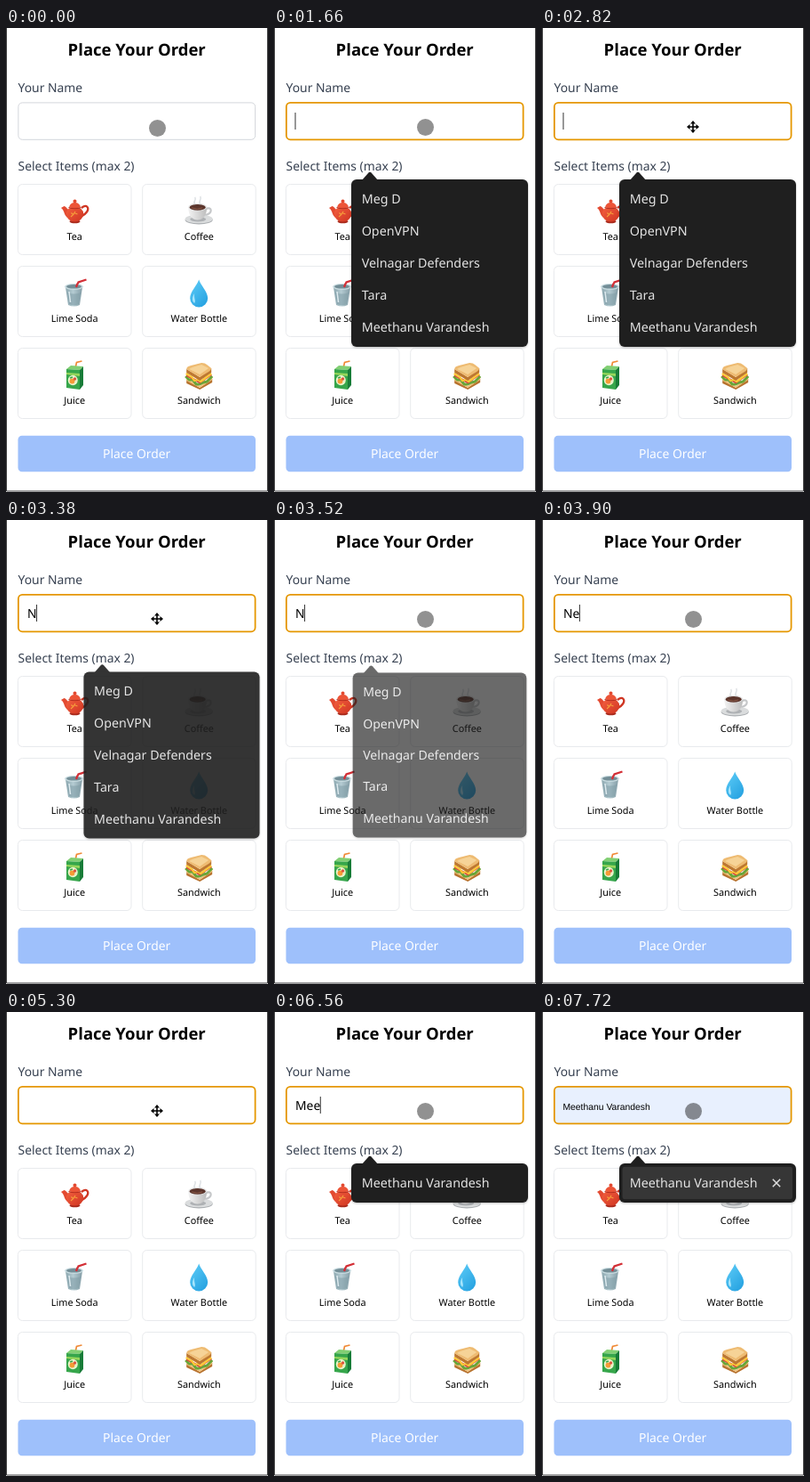
Recreate the animation shown at these times as an HTML page. Size 295 px wide and 521 px high, loop 8 s.

```html
<!DOCTYPE html>
<html lang="en">
<head>
<meta charset="utf-8">
<title>Place Your Order</title>
<style>
  html, body { margin: 0; width: 100%; height: 100%; overflow: hidden; background: #fff; }
  svg { display: block; width: 100%; height: 100%; }
  text { font: 13.9px "Noto Sans", sans-serif; text-rendering: geometricPrecision; white-space: pre; }
  .title { font-size: 18.55px; font-weight: 700; }
  .label { fill: #374151; }
  .item { font-size: 10.85px; }
  .mid { text-anchor: middle; }
  #panel text { font-size: 14.3px; fill: #e3e3e3; }
  #preview { font: 10.35px "Liberation Sans", Arial, sans-serif; }
  #panel { transform-origin: 186.5px 264px; filter: drop-shadow(0 1px 1px rgba(0,0,0,.25)); }
</style>
</head>
<body>
<svg viewBox="0 0 295 521" preserveAspectRatio="none">
  <defs>
    <linearGradient id="pot" x2="1" y2="1"><stop stop-color="#f4603f"/><stop offset="1" stop-color="#cf3522"/></linearGradient>
    <linearGradient id="china" x2="1"><stop stop-color="#f3f3f3"/><stop offset="1" stop-color="#bdbdbd"/></linearGradient>
    <linearGradient id="cup" x2="1"><stop stop-color="#8aa5ae"/><stop offset=".45" stop-color="#b4cbd2"/><stop offset="1" stop-color="#849da6"/></linearGradient>
    <linearGradient id="water" x2=".7" y2="1"><stop stop-color="#5ecdf8"/><stop offset="1" stop-color="#29a4e2"/></linearGradient>

    <g id="tea" fill="none">
      <path d="M24 12C30 7 33 12 30 16.5C28 19.5 25 20.5 23 22" stroke="#cf3522" stroke-width="2.3"/>
      <path d="M10 24C3.500 21 5.500 15 1 12L4.500 10C8 11.500 8 14 11 15Z" fill="#e34a31"/>
      <ellipse cx="16.500" cy="27.300" rx="6" ry="1.900" fill="#a92a1c"/>
      <ellipse cx="16.500" cy="18.800" rx="9.700" ry="8.600" fill="url(#pot)"/>
      <path d="M10 11.500Q11 6 16.500 6T23 11.500Z" fill="#ec5437"/>
      <path d="M9.500 11.500Q16.500 14 23.500 11.500" stroke="#b52f20" stroke-width="1.200"/>
      <circle cx="16.500" cy="4.500" r="2" fill="#e34a31"/>
      <path d="M12 22Q15 20 17 16M15 20L12.500 17.500M16.500 18L19.500 19" stroke="#f6a13c" stroke-width="1.100"/>
    </g>

    <g id="coffee" fill="none">
      <ellipse cx="16" cy="25.500" rx="15.500" ry="5" fill="#a9adb0"/>
      <ellipse cx="16" cy="24.500" rx="15.500" ry="4.800" fill="#dadcdd"/>
      <ellipse cx="15" cy="24.800" rx="9" ry="2.600" fill="#aeb1b4"/>
      <path d="M24 13C31 10 32 18 23 20" stroke="#c5c7c9" stroke-width="2.200"/>
      <path d="M4 11C4 20 8 25.500 14.500 25.500S25 20 25 11Z" fill="url(#china)"/>
      <ellipse cx="14.500" cy="11" rx="10.500" ry="4.300" fill="#e6e6e6"/>
      <ellipse cx="14.500" cy="11.400" rx="9" ry="3.300" fill="#5b352c"/>
      <path d="M8 12Q14 14.500 20 12" stroke="#8a5a48"/>
      <path d="M12 8C8 5 14 4 11.500 0M18 8C14 5 20 3 17.500 -1" stroke="#d5dadd" stroke-width="1.500" opacity=".8"/>
    </g>

    <g id="soda" fill="none">
      <path d="M18 10L20.500 3.500L29.500 .5" stroke="#d32f36" stroke-width="2.300"/>
      <path d="M6 9L9 29Q15.500 32 22 29L25 9Z" fill="url(#cup)"/>
      <path d="M8 15Q15.500 18 23 15L21 28Q15.500 30.500 10 28Z" fill="#7f9ca6" opacity=".55"/>
      <ellipse cx="15.500" cy="8.500" rx="10.500" ry="3.500" fill="#c7dadf"/>
      <ellipse cx="15.500" cy="8.300" rx="8.500" ry="2.300" fill="#738e97"/>
      <path d="M18 9L19.500 5" stroke="#d32f36" stroke-width="2.300"/>
      <path d="M10 14L11.500 26" stroke="#dceaee" stroke-width="1.500"/>
    </g>

    <g id="drop">
      <path d="M16 .5C18 7 26 14 26 21.500A10 10 0 0 1 6 21.500C6 14 14 7 16 .5Z" fill="url(#water)"/>
      <path d="M11 16C8 20 8 25 11 27C13 24 10 21 11 16Z" fill="#a7e5fc"/>
    </g>

    <g id="juice" fill="none">
      <path d="M17 8L18.500 1.500L24.500 0" stroke="#f08a37" stroke-width="1.700"/>
      <path d="M7 9L12 5L26 6L22 10Z" fill="#81cf73"/>
      <path d="M7 9L22 10V32L7 30Z" fill="#36a64b"/>
      <path d="M22 10L26 6V27L22 32Z" fill="#187c38"/>
      <path d="M7 13L22 14V17L7 15Z" fill="#96d65b"/>
      <ellipse cx="14.300" cy="21.500" rx="5.500" ry="5.800" fill="#e9f3ca"/>
      <circle cx="13.500" cy="22.500" r="2.900" fill="#f59b35"/>
      <circle cx="16.500" cy="20" r="1.700" fill="#dc5440"/>
      <path d="M11 19L14 18" stroke="#36a64b" stroke-width="1.500"/>
    </g>

    <g id="sandwich" fill="none" stroke-linejoin="round">
      <path d="M2 21L17 30L31 20V24L17 32L2 25Z" fill="#b8732f"/>
      <path d="M2 19L17 28L31 18V21L17 30L2 22Z" fill="#efc27b"/>
      <path d="M1 17L5 21L9 21L13 26L17 26L21 24L25 23L31 17" stroke="#69a53a" stroke-width="3"/>
      <path d="M2 16L17 24L30 15" stroke="#d8473a" stroke-width="2.300"/>
      <path d="M1.500 14L8 18L11 22L15 21L18 23L30 14" stroke="#ffca38" stroke-width="2.200"/>
      <path d="M2 9L17 18L30 8V13L17 22L2 13Z" fill="#bd7831"/>
      <path d="M2 9Q2 6 7 5L19 2Q23 2 25 4L30 8Q30 10 27 12L17 18Z" fill="#eebb72"/>
      <path d="M5 9Q7 7 19 4L27 8L17 15Z" fill="#f6d397"/>
    </g>
  </defs>

  <rect width="295" height="521" fill="#fff"/>
  <path d="M.5 0V520H294.500V0" fill="none" stroke="#38383a"/>
  <text class="title mid" x="147.200" y="30.500">Place Your Order</text>
  <text class="label" x="13.500" y="72">Your Name</text>
  <rect id="field" x="13.900" y="83.900" width="266.700" height="41.400" rx="4.500"/>
  <text id="typed" x="24" y="110"></text>
  <text id="preview" x="23.500" y="109.700">Meethanu Varandesh</text>
  <rect id="caret" y="95" width="1" height="19" fill="#333"/>
  <text class="label" x="13.500" y="160">Select Items (max 2)</text>
  <g id="cards"></g>
  <rect x="13.500" y="457.700" width="267.500" height="40.500" rx="4.500" fill="#9ec0fb"/>
  <text class="mid" x="147.200" y="483" fill="#fff">Place Order</text>

  <g id="panel">
    <path d="M99 171L106.500 162.500Q108 161 109.500 162.500L117 171Z" fill="#1f1f1f"/>
    <rect id="sheet" x="87" y="170" width="199" rx="6" fill="#1f1f1f"/>
    <g id="hover">
      <rect x="90.500" y="173.700" width="191.500" height="36.500" rx="3" fill="#363636"/>
      <path d="M259.800 187.800L268.200 196.200M268.200 187.800L259.800 196.200" stroke="#dedede" stroke-width="1.500"/>
    </g>
    <g id="rows"></g>
  </g>

  <circle id="dot" cx="170.500" r="9.500" fill="#000" opacity=".43"/>
  <g id="move" transform="translate(170 111)" stroke-linejoin="round">
    <path id="arrows" d="M0 -7L3 -3.500H.8V-.8H3.500V-3L7 0L3.500 3V.8H.8V3.500H3L0 7L-3 3.500H-.8V.8H-3.500V3L-7 0L-3.500 -3V-.8H-.8V-3.500H-3Z" stroke="#fff" stroke-width="2"/>
    <use href="#arrows" stroke="none"/>
    <path d="M0 -7L3 -3.500H.8V-.8H3.500V-3L7 0L3.500 3V.8H.8V3.500H3L0 7L-3 3.500H-.8V.8H-3.500V3L-7 0L-3.500 -3V-.8H-.8V-3.500H-3Z"/>
  </g>
</svg>
<script>
const LOOP = 8000;
const $ = id => document.getElementById(id);
const set = (el, attrs) => Object.entries(attrs).forEach(([k, v]) => el.setAttribute(k, v));
const show = (id, on) => { $(id).style.display = on ? '' : 'none'; };

const items = [['tea', 'Tea'], ['coffee', 'Coffee'], ['soda', 'Lime Soda'],
  ['drop', 'Water Bottle'], ['juice', 'Juice'], ['sandwich', 'Sandwich']];
$('cards').innerHTML = items.map(([icon, label], i) => {
  const x = 13.5 + i % 2 * 140.2, y = 175.5 + (i >> 1) * 92;
  return `<rect x="${x}" y="${y}" width="127.500" height="79" rx="5" fill="#fff" stroke="#e8eaed"/>
    <use href="#${icon}" x="${x + 47.5}" y="${y + 14.5}"/>
    <text class="item mid" x="${x + 63.7}" y="${y + 62.3}">${label}</text>`;
}).join('');

const full = 'Meethanu Varandesh';
const everyone = ['Meg D', 'OpenVPN', 'Velnagar Defenders', 'Tara', full];

const start = { text: '', names: [], opacity: 1, caret: false, focus: false, filled: false, move: false, dotY: 112.5 };
const fade = [3360, 3380, 3480, 3520, 3560, 3600, 3640, 3660, 3760, 3800, 3840, 3900]
  .map(at => [at, { opacity: 1 - (at - 3325) / 575 }]);
const steps = [
  [400, { dotY: 111.5 }],
  [1660, { focus: true, caret: true, names: everyone }],
  [2820, { move: true }],
  [3060, { caret: false }],
  [3360, { text: 'N', caret: true }],
  ...fade,
  [3480, { move: false }],
  [3900, { text: 'Ne', names: [] }],
  [4620, { text: 'N' }],
  [5020, { text: '' }],
  [5160, { caret: false }],
  [5300, { move: true }],
  [5620, { text: 'M', caret: true, opacity: 1, names: ['Meg D', full] }],
  [5760, { move: false }],
  [6000, { text: 'Me' }],
  [6460, { text: 'Mee' }],
  [6560, { names: [full] }],
  [7720, { text: '', caret: false, filled: true }],
];

function draw(t) {
  const s = Object.assign({}, start, ...steps.filter(([at]) => at <= t).map(([, change]) => change));
  set($('field'), {
    fill: s.filled ? '#e8f0fe' : '#fff',
    stroke: s.focus ? '#e59700' : '#d3d6db',
    'stroke-width': s.focus ? 1.8 : 1,
  });
  $('typed').textContent = s.text;
  const width = s.text ? $('typed').getComputedTextLength() : 0;
  set($('caret'), { x: 23.5 + width });
  show('caret', s.caret);
  show('preview', s.filled);
  show('hover', s.filled);

  show('panel', s.names.length);
  $('panel').style.opacity = s.opacity;
  $('panel').style.transform = `scale(${0.95 + 0.05 * s.opacity})`;
  set($('sheet'), { height: 8 + 36 * s.names.length });
  $('rows').innerHTML = s.names.map((name, i) => `<text x="98.700" y="${197 + i * 36}">${name}</text>`).join('');

  set($('dot'), { cy: s.dotY });
  show('dot', !s.move);
  show('move', s.move);
}

const began = performance.now();
function tick() {
  draw((performance.now() - began) % LOOP);
  requestAnimationFrame(tick);
}
tick();
</script>
</body>
</html>
```
